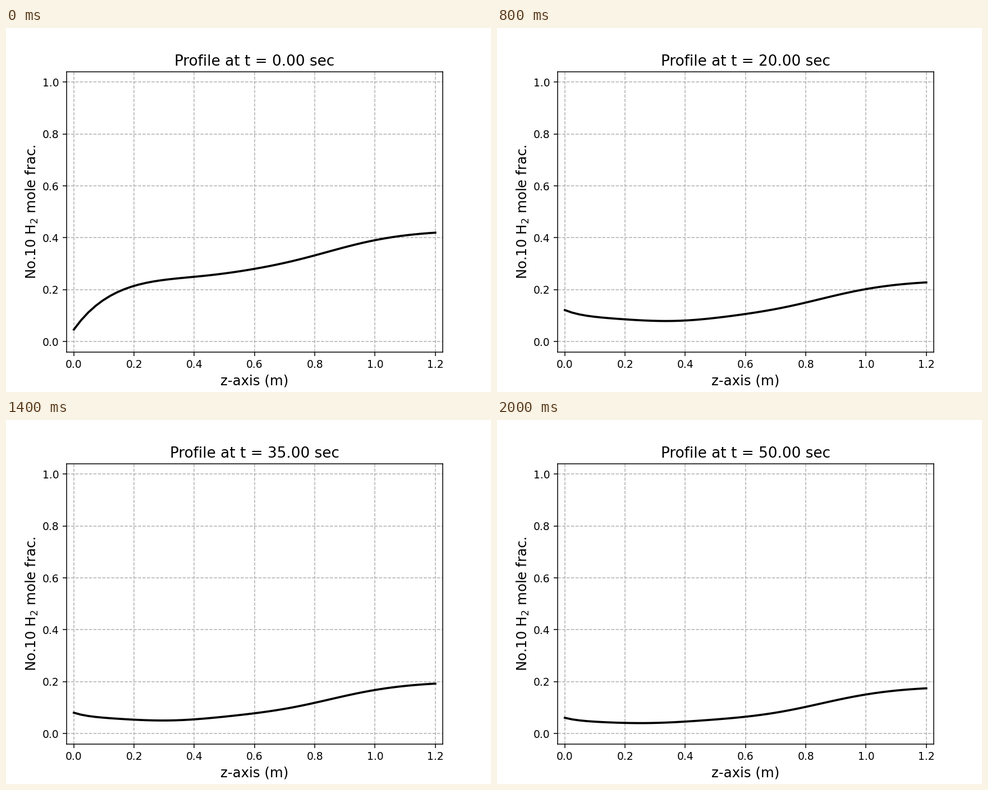
These frames come from a looping animation (864x648 px, 2100 ms). A matplotlib script:

```python
import numpy as np
import matplotlib.pyplot as plt
from matplotlib.animation import FuncAnimation

FRAMES = 21
DT = 2.5        # simulated seconds per frame
LENGTH = 1.2    # column length, m

z = np.linspace(0, LENGTH, 51)


def logistic(x):
    return 1 / (1 + np.exp(-x))


def mole_frac(t):
    """Diluting base + front near the outlet + inlet layer - mid-column dip."""
    startup = np.exp(-t / 1.3)

    base = 0.008 + 1 / (3.5 + 0.425 * t) - 0.0267 * startup

    front = (0.128 + 0.035 * np.exp(-t / 30)) * logistic((z - 0.85) / 0.13)

    layer = 0.045 + 0.09 * np.exp(-t / 13)
    inlet = (1 / (6.2 + 1.33 * t) - 0.382 * startup) * np.exp(-z / layer)

    depth = 0.011 + 3.7e-4 * t - 8e-6 * t**2
    center = 0.42 - 0.003 * t
    dip = depth * np.exp(-((z - center) / 0.2) ** 2)

    return base + front + inlet - dip


fig, ax = plt.subplots(figsize=(6.4, 4.8), dpi=135)
line, = ax.plot(z, mole_frac(0), "k-", lw=2)
title = ax.set_title("", fontsize=14)
ax.set_xlabel("z-axis (m)", fontsize=13)
ax.set_ylabel("No.10 H$_2$ mole frac.", fontsize=13, labelpad=2.6)
ax.set_xlim(-0.02 * LENGTH, 1.02 * LENGTH)
ax.set_ylim(-0.04, 1.04)
ax.grid(linestyle="--")


def update(i):
    t = i * DT
    line.set_ydata(mole_frac(t))
    title.set_text(f"Profile at t = {t:.2f} sec")
    return line, title


anim = FuncAnimation(fig, update, frames=FRAMES, interval=100, repeat=True)
plt.show()
```
